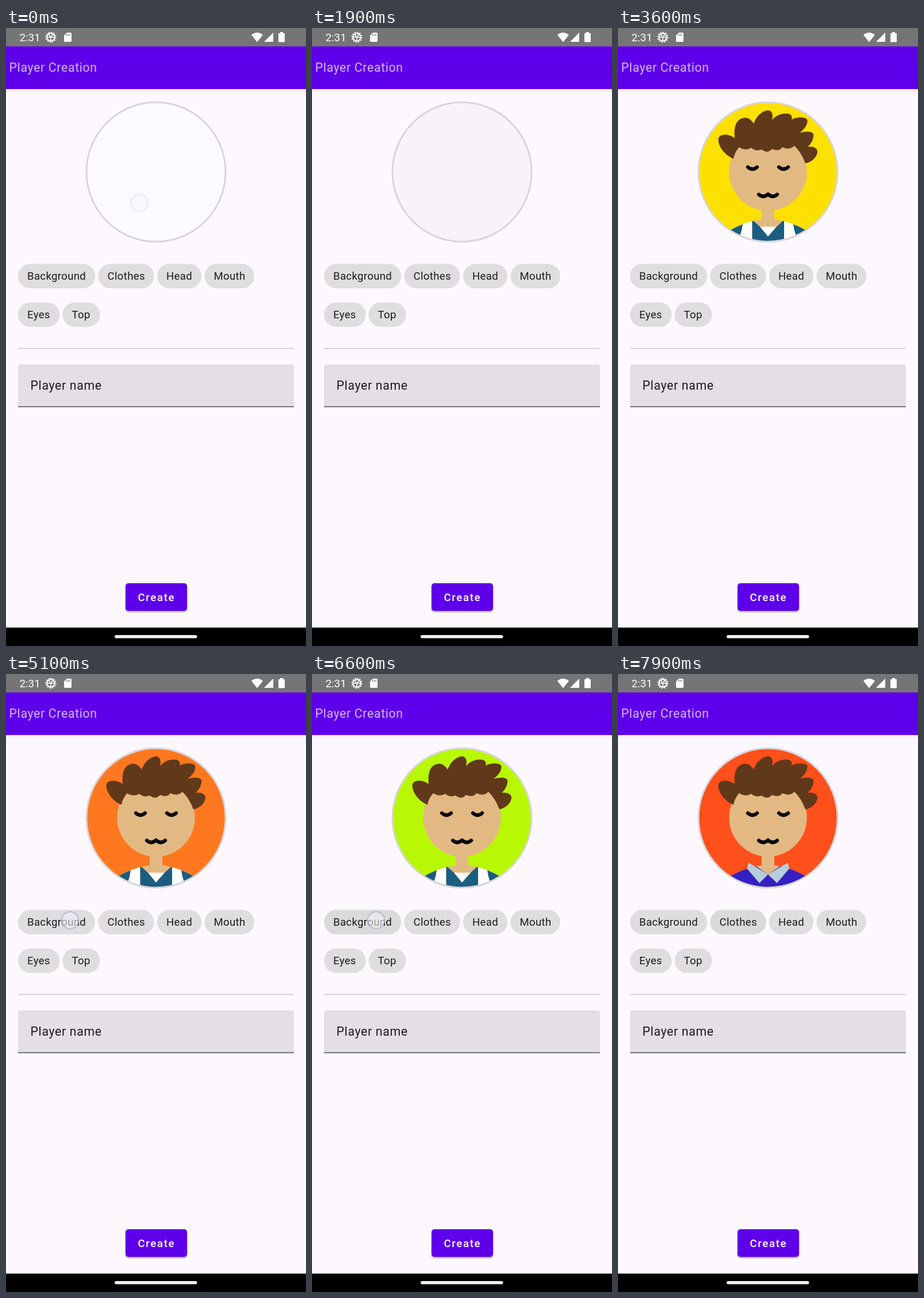
An HTML page for the animation above (8 s loop, 522 px wide and 1073 px high).

```html
<!DOCTYPE html>
<html lang="en">
<head>
<meta charset="utf-8">
<title>Player Creation</title>
<style>
  html, body { margin: 0; width: 100%; height: 100%; overflow: hidden; background: #fcf8fe; }
  svg { display: block; width: 100vw; height: 100vh; }
  text { font-family: Roboto, sans-serif; fill: #1c1a1e; }
  .body { font-size: 21.27px; letter-spacing: .66px; }
  .label { font-size: 18.6px; letter-spacing: .33px; }
  .line { fill: none; stroke: #08080b; stroke-width: 6.3; stroke-linecap: round; stroke-linejoin: round; }
</style>
</head>
<body>
<svg viewBox="0 0 522 1073">
  <defs>
    <clipPath id="disc"><circle cx="261" cy="250" r="120"/></clipPath>
    <clipPath id="torso"><path d="M190 354Q220 336 250 332L261 334L272 332Q302 336 332 354V380H190Z"/></clipPath>
    <linearGradient id="fall" x2="0" y2="1">
      <stop stop-color="#000" stop-opacity=".06"/>
      <stop offset="1" stop-color="#000" stop-opacity="0"/>
    </linearGradient>
    <filter id="blur" x="-20%" y="-30%" width="140%" height="160%"><feGaussianBlur stdDeviation="1.6"/></filter>
  </defs>

  <rect width="522" height="1073" fill="#fcf8fe"/>
  <rect y="106" width="522" height="7" fill="url(#fall)"/>
  <rect y="31" width="522" height="75" fill="#5f00ea"/>
  <rect width="522" height="32" fill="#757575"/>

  <!-- status bar -->
  <text x="23.5" y="23" font-size="18.8" style="fill:#fff">2:31</text>
  <g fill="none" stroke="#fff">
    <circle cx="78" cy="16" r="6.7" stroke-width="2"/>
    <circle cx="78" cy="16" r="8.6" stroke-width="2" stroke-dasharray="2.1 2.4"/>
    <path d="M72 16H84M78 16V22M75 11.5L77 15M81 11.5L79 15" stroke-width="1.6"/>
  </g>
  <g fill="#fff">
    <path d="M106 8H112.5Q114 8 114 9.500V22.500Q114 24 112.500 24H102.500Q101 24 101 22.500V13Z"/>
    <path d="M427 12Q437 4 447 12L437 24.500Z"/>
    <path d="M465 8V24H449Z"/>
    <path d="M477 9V7H482V9H484Q485 9 485 10V23.500Q485 24.500 484 24.500H475Q474 24.500 474 23.500V10Q474 9 475 9Z"/>
  </g>
  <path d="M105.500 10.500V13.500M108.300 10.500V13.500M111 10.500V13.500" stroke="#757575" stroke-width="1.3"/>
  <text class="body" x="5.500" y="76.300" style="fill:#d3b8f9">Player Creation</text>

  <!-- avatar -->
  <circle id="back" cx="261" cy="250" r="120.500"/>
  <g id="avatar" clip-path="url(#disc)">
    <path d="M250 305H272V340H250Z" fill="#e3b983"/>
    <g clip-path="url(#torso)">
      <path d="M190 325H332V380H190Z" fill="#e3b983"/>
      <g id="vest">
        <path d="M190 325H233.500V380H190ZM289 325H332V380H289ZM240 345H282L261 366Z" fill="#fdfdfb"/>
        <path d="M190 330H217Q218 349 210 365V380H190ZM332 330H305Q304 349 312 365V380H332ZM233.500 333L247 345L261 362L276 345L289 333V380H233.500Z" fill="#1b5c80"/>
      </g>
      <path class="shirt" d="M190 325H227L261 348L295 325H332V380H190Z" fill="#3720c2"/>
    </g>
    <path class="shirt" d="M227 327.500L261 348L246 363L224.500 338ZM295.500 327.500L261 348L276.500 363L298 338Z" fill="#b6cedb"/>
    <circle cx="261" cy="249.500" r="67.700" fill="#e3b983"/>
    <path fill="#60381a" d="M201 227C188 222 175 208 174.500 194C175 183 192 183 203 191
      C201 171 206 158 219 156C227 155 232 160 236 166C241 152 252 143 262 143C269 144 270 152 268 160
      C276 150 288 147 297 149C303 151 303 155 302 159C311 154 327 154 329.500 160C330 169 324 176 316 182
      C326 179 338 179 340 184C341 193 336 201 330 206.500C339 205 346 208 347 214C347 224 337 233 326 235
      Q319 216 307 204.500Q298 213 286 207Q281 215 268 210Q260 219 250 211Q240 215 232 208Q222 214 211 207Q203 215 201 227Z"/>
    <path class="line" d="M226 241.500Q234 248.500 242 241.500M280 241.500Q288 248.500 296 241.500M245 289Q253 296 261 288.500Q269 296 277 289"/>
  </g>
  <circle cx="261" cy="250" r="121" fill="none" stroke="#d9d5da" stroke-width="3"/>

  <g id="chips"></g>

  <path d="M21 556.500H501" stroke="#c9c5cb" stroke-width="1.500"/>
  <path d="M21 658V589Q21 584 26 584H496Q501 584 501 589V658Z" fill="#e4dfe5"/>
  <path d="M21 657.500H501" stroke="#504c53" stroke-width="1.500"/>
  <text class="body" x="42.500" y="628.300">Player name</text>

  <rect x="208" y="967" width="107" height="47" rx="5" fill="#000" opacity=".35" filter="url(#blur)"/>
  <rect x="208" y="964" width="107" height="48" rx="5" fill="#5f00ea"/>
  <text x="229.500" y="995" font-size="18.600" font-weight="500" letter-spacing="1.660" style="fill:#fff">Create</text>

  <rect y="1041" width="522" height="32"/>
  <rect x="189" y="1054" width="143.500" height="5.500" rx="2.750" fill="#f2eef3"/>

  <circle id="touch" r="14.700" fill="#f0eef2" fill-opacity=".62" stroke="#a9a9c6" stroke-opacity=".7" stroke-width="2"/>
</svg>

<script>
const LOOP = 8000;
const $ = id => document.getElementById(id);
const svgNS = 'http://www.w3.org/2000/svg';

function add(parent, tag, attrs, text = '') {
  const el = document.createElementNS(svgNS, tag);
  for (const key in attrs) el.setAttribute(key, attrs[key]);
  el.textContent = text;
  return parent.appendChild(el);
}

const chips = [
  ['Background', 21, 409.5, 134], ['Clothes', 160.5, 409.5, 97], ['Head', 263, 409.5, 77],
  ['Mouth', 345.5, 409.5, 86.5], ['Eyes', 21, 476.5, 72.5], ['Top', 98.5, 476.5, 65]
].map(([name, x, y, width]) => {
  const box = add($('chips'), 'rect', { x, y, width, height: 42.5, rx: 21.25 });
  add($('chips'), 'text', { class: 'label', x: x + 16, y: y + 27.7 }, name);
  return box;
});

const spots = { disc: [232.5, 303.5], background: [111.5, 427.5], clothes: [217, 430] };
const lime = '#b8f805', red = '#ff4f1b', cyan = '#00dbff', orange = '#ff781f';

// Each step changes only the values it lists.
const steps = [
  [0, { back: '#fdfaff', avatar: false, shirt: false, spot: 'disc', touch: .35, lit: -1 }],
  [100, { touch: .25 }], [200, { touch: .15 }], [300, { touch: .07 }], [400, { touch: 0 }],
  [1900, { back: '#f7f3f8' }],
  [2100, { back: '#fbe000', avatar: true }],
  [4000, { spot: 'background', touch: 1 }],
  [4300, { back: orange, touch: 0, lit: 0 }],
  [4600, { lit: -1 }],
  [4800, { touch: 1 }],
  [4900, { touch: 0, lit: 0 }],
  [5100, { touch: 1, lit: -1 }],
  [5400, { back: cyan, touch: 0, lit: 0 }],
  [5600, { touch: 1 }],
  [5700, { touch: 0 }],
  [6100, { touch: 1, lit: -1 }],
  [6400, { back: lime, touch: 0, lit: 0 }],
  [6600, { touch: 1 }],
  [7000, { touch: .4 }],
  [7100, { back: red, touch: 0 }],
  [7500, { lit: -1 }],
  [7700, { spot: 'clothes', touch: 1 }],
  [7900, { shirt: true, touch: 0, lit: 1 }]
];

function stateAt(t) {
  return Object.assign({}, ...steps.filter(([at]) => at <= t).map(([, change]) => change));
}

const show = (el, on) => { el.style.display = on ? '' : 'none'; };
const shirt = document.querySelectorAll('.shirt');
const start = performance.now();

function draw() {
  const s = stateAt((performance.now() - start) % LOOP);
  const [x, y] = spots[s.spot];
  $('back').setAttribute('fill', s.back);
  show($('avatar'), s.avatar);
  show($('vest'), !s.shirt);
  shirt.forEach(el => show(el, s.shirt));
  chips.forEach((el, i) => el.setAttribute('fill', i === s.lit ? '#d9dad9' : '#dfdde0'));
  $('touch').setAttribute('transform', `translate(${x} ${y})`);
  $('touch').setAttribute('opacity', s.touch);
  requestAnimationFrame(draw);
}
draw();
</script>
</body>
</html>
```
